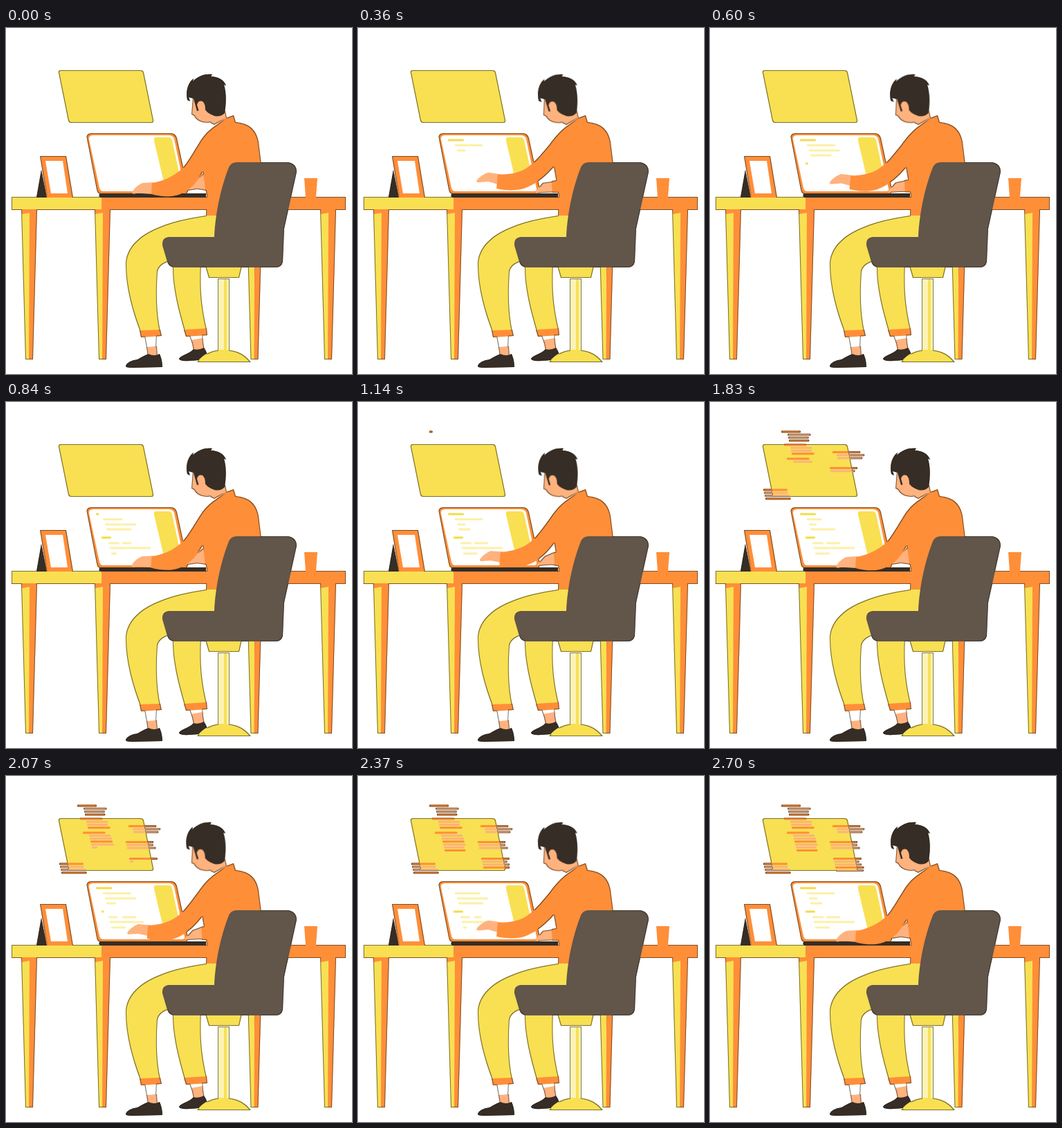
Animation, 500 px wide and 500 px high, one loop 2.73 s. Source, as an HTML page:

```html
<!DOCTYPE html>
<html lang="en">
<head>
<meta charset="utf-8">
<title>Working at a desk</title>
<style>
html, body { margin: 0; width: 100%; height: 100%; overflow: hidden; background: #fff; }
svg { display: block; width: 100vw; height: 100vh; }
.y { fill: #f8e052; }
.o { fill: #ff8e39; }
.s { fill: #ffb27d; }
.d { fill: #362d26; }
.c { fill: #62554a; }
.w { fill: #fff; }
.p { fill: #fdf3b4; }

/* three strokes of the arms per loop */
.sleeve, .hand, .far, .cuff, .head {
  animation: 455ms cubic-bezier(.37, 0, .63, 1) infinite alternate;
}
.sleeve { animation-name: sleeve; }
.hand { animation-name: hand; }
.far { animation-name: far; }
.cuff { animation-name: cuff; }
.head { animation-name: nod; transform-origin: 306px 134px; }

@keyframes sleeve {
  from { d: path("M300 143C290 150 284 158 278 168C268 184 258 202 250 207C240 215 228 221 211 224L210 240C225 244 240 245 252 240C268 233 275 224 285 207L330 200Z"); }
  to { d: path("M300 143C290 151 283 160 276 169C266 180 254 195 241 203C230 209 217 211 201 210L199 231C212 234 232 235 244 229C260 222 271 213 284 199L330 200Z"); }
}
@keyframes hand {
  from { d: path("M213 223L197 224C190 227 184 233 182 238Q183 241 188 239L196 239L212 240Z"); }
  to { d: path("M204 210L187 207C181 209 173 214 170 219Q170 222 176 221L188 220L203 225Z"); }
}
@keyframes far {
  from { d: path("M289 211L284 211L274 221L262 233L263 235L276 233L290 235Z"); }
  to { d: path("M290 222L281 223L266 224L256 236L257 239L280 238L290 238Z"); }
}
@keyframes cuff {
  from { d: path("M287 212L294 211L294 236L288 235Z"); }
  to { d: path("M279 222L294 220L294 238L280 238Z"); }
}
@keyframes nod {
  from { transform: none; }
  to { transform: rotate(-1.7deg); }
}
</style>
</head>
<body>
<svg viewBox="0 0 500 500">
  <defs>
    <filter id="rim" x="0" y="0" width="500" height="500" filterUnits="userSpaceOnUse" color-interpolation-filters="sRGB">
      <feMorphology in="SourceAlpha" operator="erode" radius="1" result="core"/>
      <feComposite in="SourceGraphic" in2="core" operator="in" result="inner"/>
      <feFlood flood-color="#2a2418" flood-opacity=".6"/>
      <feComposite in2="SourceAlpha" operator="in" result="edge"/>
      <feMerge>
        <feMergeNode in="SourceGraphic"/>
        <feMergeNode in="edge"/>
        <feMergeNode in="inner"/>
      </feMerge>
    </filter>
    <g id="leg">
      <path class="y" d="M0 262H12V479H6Z"/>
      <path class="o" d="M0 262H23L17 479H11L12 267L1 269Z"/>
    </g>
  </defs>

  <g filter="url(#rim)">
    <path class="y" d="M79 61H195Q198 61 199 64L213 133Q214 137 210 137H94Q91 137 90 134L76 65Q75 61 79 61Z"/>
    <g id="board"></g>

    <use href="#leg" x="22"/>
    <use href="#leg" x="128"/>
    <use href="#leg" x="347.5"/>
    <use href="#leg" x="454"/>
    <path class="o" d="M8 244H491V263H8Z"/>
    <path class="y" d="M8 244H138V262H8Z"/>

    <path class="d" d="M51 205L59 245H44Z"/>
    <path class="o" d="M49 185H87L97 245H59Z"/>
    <path class="w" d="M57 192H82L89 239H65Z"/>

    <path class="o" d="M124 152H238Q245 152 247 159L263 233Q264 240 257 240H137Q132 240 131 233L117 160Q115 152 124 152Z"/>
    <path class="w" d="M126 155H235Q241 155 243 160L258 232Q259 236 254 236H141Q136 236 135 231L120 161Q119 155 126 155Z"/>
    <path class="y" d="M217 158H235Q239 158 240 162L253 222H231Q228 222 227 218L214 163Q213 158 217 158Z"/>
    <g id="screen"></g>
    <path class="d" d="M136 239H289V245H136Q133 242 136 239Z"/>

    <path class="w" d="M200 445L218 444L217 461L203 462Z"/>
    <path class="s" d="M203 461L218 460L219 475H205Z"/>
    <path class="d" d="M173 488Q176 481 190 479Q200 473 206 471Q214 475 222 471Q226 480 226 490L182 491Q172 491 173 488Z"/>
    <path class="w" d="M265 445L284 443L285 452L269 456Z"/>
    <path class="s" d="M268 451L284 448L287 466H271Z"/>
    <path class="d" d="M250 478C252 473 265 471 271 464Q278 466 286 462Q292 470 291 478L278 480Q250 483 250 478Z"/>

    <path class="y" d="M241 340C240 375 250 410 258 438L290 435C283 405 280 380 282 340Z"/>
    <path class="o" d="M257 436L290 434L291 444L260 446Z"/>
    <path class="y" d="M306 269C240 276 174 295 173 342C173 375 183 410 194 439L223 438C217 410 217 380 219 352Q222 340 240 336L320 330Z"/>
    <path class="o" d="M193 437L223 436L225 445L195 447Z"/>

    <path class="p" d="M306 362H323V468H306Z"/>
    <path class="y" d="M315 363H319V468H315Z"/>
    <path class="y" d="M288 344H341L337 361H293Z"/>
    <path class="y" d="M276 483C285 470 300 465 313 465C335 465 345 472 354 483Z"/>

    <path class="far s"/>
    <path class="cuff o"/>
    <path class="o" d="M300 143L318 130L329 126L332 136C352 138 362 147 365 165L370 205L330 271H289L290 243L286 218L282 195Z"/>

    <g class="head">
      <path class="s" d="M299 118L317 120L319 130L301 140L295 137Z"/>
      <path class="s" d="M270 100L268 125L272 127C274 133 282 137 292 137L303 134L308 105Z"/>
      <path class="d" d="M262 104C259 90 264 78 271 73L270 77C278 69 288 66 298 67L296 70C306 70 315 75 318 83L315 82C319 95 318 110 316 123Q310 129 301 127C293 124 290 121 287 117L276 120L271 102L264 100L266 106Z"/>
      <path class="s" d="M276 111Q278 104 284 106Q288 109 288 118L279 121Z"/>
    </g>

    <path class="hand s"/>
    <path class="sleeve o"/>

    <path class="c" d="M333 194H408Q420 196 420 208L402 290L400 338Q398 346 390 346H244Q236 346 233 338L226 314Q225 303 235 302H301C303 260 313 225 321 204Q324 194 333 194Z"/>
  </g>

  <path class="o" d="M431 217H450L448 245H433Z"/>
</svg>

<script>
const LOOP = 2730, PULSE = 780, PITCH = 4.25;
const bars = [];
const clamp = v => Math.min(1, Math.max(0, v));

let seed = 7;
const random = () => (seed = seed * 16807 % 2147483647) / 2147483647;

// grow(t) gives the visible share of the bar
function bar(parent, x, y, width, fill, grow) {
  const el = document.createElementNS("http://www.w3.org/2000/svg", "rect");
  const attrs = { x, y: y - 1.5, height: 3, rx: 1, fill };
  for (const k in attrs) el.setAttribute(k, attrs[k]);
  document.getElementById(parent).append(el);
  bars.push({ el, width, grow });
}

// Laptop lines keep typing and erasing, each a little after the one above
function screenLine(i, x, y, width, fill = "#fdf0a8") {
  const delay = PULSE * (.03 + .95 * Math.sin(i / 8 * Math.PI / 2));
  bar("screen", x, y, width, fill, t => {
    const u = (t - delay) / PULSE;
    const phase = u - Math.floor(u);
    return u < 0 ? 0 : clamp(Math.min(phase / .25, (1 - phase) / .2));
  });
}
const heading = "#f3dc4c";
screenLine(0, 130, 162, 23, heading);
screenLine(1, 140, 169.5, 41);
screenLine(2, 143, 177, 45);
screenLine(3, 145, 184, 36);
screenLine(4, 138, 196, 14, heading);
screenLine(5, 148, 204, 16);
screenLine(6, 168, 204, 20);
screenLine(5, 150, 211, 59);
screenLine(8, 152, 219, 21);

// Board paragraphs type line by line and drift right with the slant
function paragraph({ x, y, lines, start, step, width, indent = 0 }) {
  for (let i = 0; i < lines; i++) {
    const begin = start + i * step;
    const left = x + i + (i ? indent : 0);
    const w = width + (random() - .5) * 6;
    bar("board", left, y + i * PITCH, w, i % 3 ? "#fcb27c" : "#ff8e39",
      t => clamp((t - begin) / step));
  }
}
const first = { step: 71, width: 31, indent: 8 };
paragraph({ ...first, x: 103, y: 43, lines: 4, start: 1128 });
paragraph({ ...first, x: 107, y: 62, lines: 4, start: 1412 });
paragraph({ ...first, x: 111, y: 82, lines: 7, start: 1696 });
const second = { step: 108, width: 39 };
paragraph({ ...second, x: 177, y: 72.5, lines: 3, start: 1299, indent: 5 });
paragraph({ ...second, x: 173, y: 95.5, lines: 3, start: 1623 });
paragraph({ ...second, x: 178, y: 119.5, lines: 5, start: 1947 });
paragraph({ x: 77, y: 127, lines: 4, start: 1420, step: 55, width: 34 });

let origin;
function draw(now) {
  origin ??= now;
  const t = (now - origin) % LOOP;
  for (const { el, width, grow } of bars) el.setAttribute("width", width * grow(t));
  requestAnimationFrame(draw);
}
requestAnimationFrame(draw);
</script>
</body>
</html>
```
